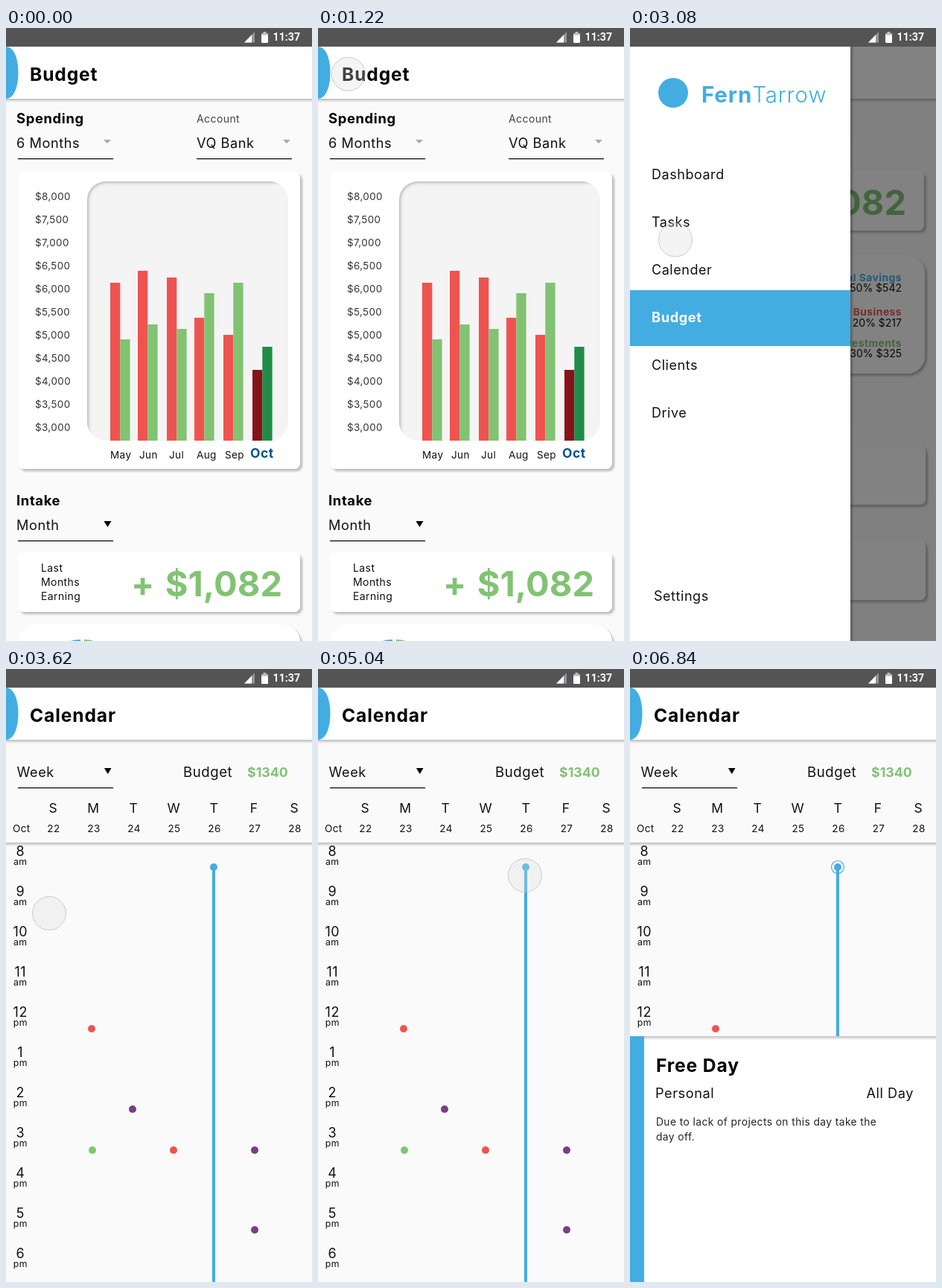
Animation, 411 px wide and 823 px high, one loop 8.06 s. Source, as an HTML page:

```html
<!DOCTYPE html>
<html lang="en">
<head>
<meta charset="utf-8">
<title>Budget app walkthrough</title>
<style>
  html, body { margin: 0; width: 100%; height: 100%; overflow: hidden; background: #fafafa; }
  svg { display: block; width: 100vw; height: 100vh; }
  text { font-family: Inter, "Open Sans", sans-serif; letter-spacing: .03em; white-space: pre; }
  .bold { font-weight: 700; letter-spacing: .035em; }
  .tight { letter-spacing: 0; }
  .clock { font-family: Roboto, sans-serif; font-weight: 700; letter-spacing: 0; }
</style>
</head>
<body>
<svg id="stage" viewBox="0 0 411 823" preserveAspectRatio="none">
  <defs>
    <linearGradient id="fall" x2="0" y2="1">
      <stop stop-opacity=".25"/><stop offset="1" stop-opacity="0"/>
    </linearGradient>
    <linearGradient id="side">
      <stop stop-opacity=".3"/><stop offset="1" stop-opacity="0"/>
    </linearGradient>
    <filter id="lift" x="-10%" y="-10%" width="120%" height="130%">
      <feDropShadow dx="3" dy="3" stdDeviation="1.5" flood-opacity=".25"/>
    </filter>
    <filter id="soft"><feGaussianBlur stdDeviation="2"/></filter>
    <clipPath id="plot"><rect x="109" y="206" width="270" height="348" rx="25"/></clipPath>
  </defs>
</svg>
<script>
const BLUE = '#43ade1', RED = '#ef5350', GREEN = '#81c373', PURPLE = '#7b3c87';
const LOOP = 8060, STEP = 20;
const stage = document.getElementById('stage');

// Markup helpers
const rect = (x, y, w, h, fill, more = '') =>
  `<rect x="${x}" y="${y}" width="${w}" height="${h}" fill="${fill}" ${more}/>`;
const dot = (x, y, r, fill, more = '') =>
  `<circle cx="${x}" cy="${y}" r="${r}" fill="${fill}" ${more}/>`;
const path = (d, fill) => `<path d="${d}" fill="${fill}"/>`;
const text = (s, x, y, size, { fill = '#111', cls = '', anchor = 'start' } = {}) =>
  `<text x="${x}" y="${y}" font-size="${size}" fill="${fill}" class="${cls}" text-anchor="${anchor}">${s}</text>`;
const bold = (s, x, y, size, fill = '#000', anchor = 'start') =>
  text(s, x, y, size, { fill, cls: 'bold', anchor });
const mid = (s, x, y, size) => text(s, x, y, size, { anchor: 'middle' });
const right = (s, x, y, size) => text(s, x, y, size, { anchor: 'end', cls: 'tight' });
const card = (x, y, w, h, r = 8) => rect(x, y, w, h, '#fff', `rx="${r}" filter="url(#lift)"`);
const shadowBelow = y => rect(0, y, 411, 5, 'url(#fall)');
const caret = (x, y, w, h, fill) => path(`M${x} ${y}h${w}l${-w / 2} ${h}z`, fill);
const rule = (x, y) => rect(x, y, 128, 1.2, '#000');
const page = body => rect(0, 25, 411, 798, '#fafafa') + body;

const header = title =>
  shadowBelow(95) + rect(0, 25, 411, 70, '#fff') +
  path('M0 25C11 25 16.500 42 16.500 60S11 95 0 95z', BLUE) +
  bold(title, 32, 71, 24.600);

const statusBar =
  rect(0, 0, 411, 25, '#545454') +
  path('M334 5V19.500H320z', '#8d9a9c') + path('M330 9.300V19.500H320z', '#fff') +
  rect(343, 7, 9, 13, '#fff', 'rx="1"') + rect(345.5, 5, 4, 3, '#b5bfc0') +
  rect(343, 7, 9, 2.500, '#b5bfc0') +
  text('11:37', 358.500, 17.300, 14.200, { fill: '#fff', cls: 'clock' });

function earningAmount(y) {
  return text('+', 168, y, 46, { fill: GREEN, cls: 'bold' }) +
    text('$1,082', 371, y, 47, { fill: GREEN, cls: 'bold tight', anchor: 'end' });
}

function chart() {
  const bars = [
    ['May', 140, 342, 418, 140], ['Jun', 177, 326, 398, 179], ['Jul', 216, 335, 404, 219],
    ['Aug', 253, 389, 356, 256], ['Sep', 292, 412, 342, 294], ['Oct', 331, 459, 428, 328]
  ];
  let out = card(16, 193, 379, 399);
  for (let i = 0; i < 11; i++) {
    const amount = '$' + (8000 - i * 500).toLocaleString('en-US');
    out += text(amount, 39, 231 + i * 31, 13.4, { fill: '#333' });
  }
  out += `<g clip-path="url(#plot)">` + rect(109, 206, 270, 348, '#f4f4f4') +
    `<rect x="107" y="204" width="290" height="380" rx="27" fill="none" stroke="#000"
      stroke-opacity=".3" stroke-width="7" filter="url(#soft)"/></g>`;
  for (const [month, x, spent, earned, labelX] of bars) {
    const now = month === 'Oct';
    out += rect(x, spent, 13.300, 554 - spent, now ? '#87131a' : RED) +
      rect(x + 13.300, earned, 13.300, 554 - earned, now ? '#208c48' : GREEN) +
      (now ? bold(month, labelX, 577, 17.400, '#005288') : text(month, labelX, 578, 13.500));
  }
  return out;
}

const budgetScene = page(
  header('Budget') +
  bold('Spending', 14, 128, 18.400) + text('Account', 256, 127, 14, { fill: '#444' }) +
  text('6 Months', 14, 161, 18.200) + text('VQ Bank', 256, 161, 18.200) +
  caret(131, 150, 10, 5, '#aaa') + caret(372, 150, 10, 5, '#aaa') +
  rule(16, 175) + rule(256, 175) + chart() +
  bold('Intake', 14, 641, 18.400) + text('Month', 14, 674, 18.200) +
  caret(131.5, 662, 10, 8, '#000') + rule(16, 688) +
  card(16, 704, 379, 80) +
  ['Last', 'Months', 'Earning'].map((s, i) => text(s, 47, 730 + i * 19, 14)).join('') +
  earningAmount(763) +
  card(16, 801, 379, 159, 24) +
  path('M100 821A60 60 0 0 0 42 881H100z', BLUE) +
  path('M105 821A60 60 0 0 1 163 881H105z', GREEN));

function menuScene() {
  const shares = [
    ['Personal Savings', '50% $542', 340, BLUE, 14],
    ['Business', '20% $217', 386, RED, 15],
    ['Investments', '30% $325', 428, GREEN, 14]
  ];
  const items = ['Dashboard', 'Tasks', 'Calender', 'Budget', 'Clients', 'Drive'];
  return page(
    header('Budget') +
    card(16, 192, 379, 80) + earningAmount(251) +
    card(16, 305, 380, 159, 24) +
    shares.map(([name, share, y, fill, gap]) =>
      bold(name, 365, y, 13.800, fill, 'end') + right(share, 365, y + gap, 14)).join('') +
    card(16, 561, 381, 79) + card(16, 688, 381, 80) +
    rect(0, 25, 411, 798, '#000', 'opacity=".49"') +
    rect(296, 25, 5, 798, 'url(#side)') +
    rect(0, 25, 296, 798, '#fff') +
    dot(58, 87, 20, BLUE) +
    `<text x="96" y="100" font-size="29.500" fill="${BLUE}"><tspan font-weight="700">Fern</tspan><tspan font-weight="300">Tarrow</tspan></text>` +
    rect(0, 352, 296, 75, BLUE) +
    items.map((s, i) => s === 'Budget'
      ? bold(s, 29, 395, 18.200, '#fff')
      : text(s, 29, 203 + i * 64, 18)).join('') +
    text('Settings', 32, 769, 18));
}

function calendarScene() {
  const events = [
    [115, 483, RED], [170, 591, PURPLE], [116, 646, GREEN],
    [225, 646, RED], [334, 646, PURPLE], [334, 753, PURPLE]
  ];
  let out = header('Calendar') +
    text('Week', 14.500, 145, 18.200) + caret(132, 133, 9.500, 8, '#000') + rule(16, 159) +
    text('Budget', 238, 145, 18.600) +
    text('$1340', 324, 145, 17.800, { fill: GREEN, cls: 'bold tight' }) +
    text('Oct', 9, 219, 13.500) + shadowBelow(233);
  [...'SMTWTFS'].forEach((day, i) => {
    const x = 63.300 + i * 54;
    out += mid(day, x, 193, 17.500) + mid(22 + i, x + .7, 219, 13.500);
  });
  for (let i = 0; i < 11; i++) {
    out += mid((i + 7) % 12 + 1, 19.300, 251 + i * 54, 18) +
      mid(i < 4 ? 'am' : 'pm', 19.300, 263 + i * 54, 12.300);
  }
  out += rect(277, 266, 4, 557, BLUE) + dot(279, 266, 5, BLUE);
  return page(out + events.map(([x, y, fill]) => dot(x, y, 5, fill)).join(''));
}

const detailSheet =
  dot(279, 266, 8.500, 'none', `stroke="${BLUE}" stroke-width="1.2"`) +
  rect(0, 493, 411, 330, '#fff') + shadowBelow(493) + rect(0, 493, 19, 330, BLUE) +
  bold('Free Day', 35, 541, 24.600) +
  text('Personal', 34, 576, 18.200) + text('All Day', 381, 576, 18.200, { anchor: 'end' }) +
  text('Due to lack of projects on this day take the', 35, 613, 13.800, { fill: '#222' }) +
  text('day off.', 35, 633, 13.800, { fill: '#222' });

// Each layer is visible from its start time until its end time.
const layers = [
  [budgetScene, 0, 1840], [menuScene(), 1840, 3620],
  [calendarScene(), 3620, LOOP], [detailSheet, 5720, LOOP]
];
stage.insertAdjacentHTML('beforeend',
  layers.map(([body]) => `<g class="layer">${body}</g>`).join('') + statusBar +
  `<circle id="touch" r="22.500" fill="#d9d9d9" fill-opacity=".3" stroke="#bbb" stroke-opacity=".75"/>`);
const groups = stage.querySelectorAll('.layer');
const touch = document.getElementById('touch');

// Touch moves: start, end, then the points of a Bezier curve.
const moves = [
  [560, 1340, [434, 23], [14, 64.5]],
  [1400, 1500, [14, 64.5], [6, 65]],
  [2460, 3260, [6, 65], [75, 191], [58, 317]],
  [3280, 3440, [58, 317], [58, 328]],
  [3960, 5040, [58, 328], [131.3, 307], [204.7, 334], [278, 277]],
  [5200, 5360, [278, 277], [279, 271]],
  [6740, 6840, [279, 271], [438, 230]]
];
const smooth = p => p * p * (3 - 2 * p);

function bezier(points, u) {
  while (points.length > 1) {
    points = points.slice(1).map((b, i) => b.map((v, k) => points[i][k] + (v - points[i][k]) * u));
  }
  return points[0];
}

function draw(t) {
  layers.forEach(([, from, to], i) => {
    groups[i].style.display = t >= from && t < to ? '' : 'none';
  });
  const move = moves.filter(([from]) => t >= from).pop() || moves[0];
  const [from, to, ...points] = move;
  const p = Math.min(1, Math.max(0, (t - from) / (to - from)));
  const [x, y] = bezier(points, smooth(p));
  touch.setAttribute('cx', x);
  touch.setAttribute('cy', y);
  touch.style.display = t >= 580 && t < 6840 ? '' : 'none';
}

function tick() {
  draw(Math.floor(performance.now() % LOOP / STEP) * STEP);
  requestAnimationFrame(tick);
}
tick();
</script>
</body>
</html>
```
